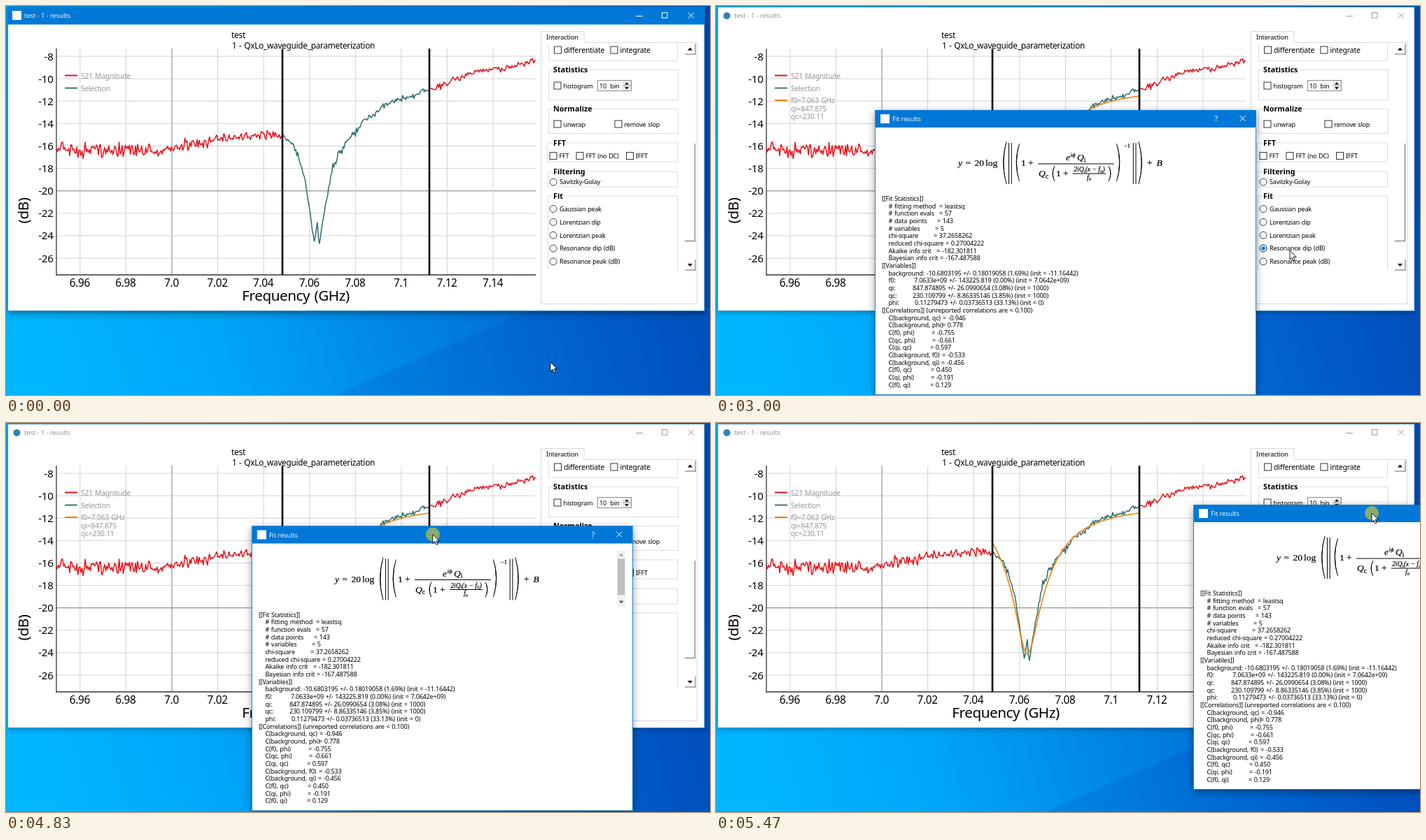
Recreate the animation shown at these times as an HTML page. Size 1006 px wide and 557 px high, loop 6280 ms.

```html
<!DOCTYPE html>
<html lang="en">
<head>
<meta charset="utf-8">
<title>Fit results</title>
<style>
html, body { margin: 0; width: 100%; height: 100%; overflow: hidden; background: #0078d7; }
svg { display: block; width: 100%; height: 100%; }
text { font-family: "Noto Sans", "Open Sans", sans-serif; letter-spacing: -.022em; word-spacing: .07em; white-space: pre; }
.bold { font-weight: 700; letter-spacing: 0; }
.bar { font-family: "Open Sans", "Noto Sans", sans-serif; letter-spacing: -.01em; word-spacing: 0; }
.math text { font-family: "Liberation Serif", "Noto Serif", serif; letter-spacing: 0; word-spacing: 0; stroke: #000; stroke-width: .2; }
.it { font-style: italic; }
.mid { text-anchor: middle; }
.end { text-anchor: end; }
.soft { filter: drop-shadow(0 3px 6px rgba(0, 0, 0, .4)); }
.faint { filter: drop-shadow(0 2px 4px rgba(0, 0, 0, .25)); }
</style>
</head>
<body>
<svg id="stage" viewBox="0 0 1006 557" preserveAspectRatio="none"></svg>
<script>
const LOOP = 6280;
const RED = '#e3131b', TEAL = '#2c6f6c', ORANGE = '#f57f0c', BLUE = '#0078d7';

// Drawing helpers
const text = (x, y, s, size, cls = '', fill = '#000') =>
  `<text x="${x}" y="${y}" font-size="${size}" class="${cls}" fill="${fill}">${s}</text>`;
const line = (x1, y1, x2, y2, stroke = '#000', w = 1) =>
  `<path d="M${x1} ${y1}L${x2} ${y2}" stroke="${stroke}" stroke-width="${w}" fill="none"/>`;
const rect = (x, y, w, h, fill, stroke = 'none', more = '') =>
  `<rect x="${x}" y="${y}" width="${w}" height="${h}" fill="${fill}" stroke="${stroke}" ${more}/>`;
const shape = (d, fill) => `<path d="${d}" fill="${fill}"/>`;
const cross = (x, y, r, c) => line(x - r, y - r, x + r, y + r, c) + line(x - r, y + r, x + r, y - r, c);
const group = (id, body, more = '') => `<g id="${id}" ${more}>${body}</g>`;

// Linear interpolation through rows of [key, ...values]
function along(rows, k) {
  if (k <= rows[0][0]) return rows[0].slice(1);
  for (let i = 1; i < rows.length; i++) {
    const a = rows[i - 1], b = rows[i];
    if (k <= b[0]) return a.slice(1).map((v, j) => v + (b[j + 1] - v) * (k - a[0]) / (b[0] - a[0]));
  }
  return rows[rows.length - 1].slice(1);
}

// Chart
const px = f => 237 + (f - 7) * 3279;
const py = v => 72 + (-8 - v) * 16.06;

let seed = 29;
function random() {
  seed = (seed * 16807) % 2147483647;
  return seed / 2147483647;
}

// x, mean height, noise
const trend = [
  [72, 206, 11], [130, 207, 12], [215, 207, 11], [245, 202, 11], [275, 199, 10], [300, 193, 8],
  [335, 187, 7], [375, 184, 7], [395, 186, 5], [405, 195, 4], [412, 206, 7], [420, 222, 8],
  [425, 241, 5], [430, 266, 6], [435, 298, 8], [440, 331, 8], [443, 328, 4], [444.5, 302, 2],
  [447, 346, 3], [452, 312, 6], [460, 262, 7], [468, 231, 9], [475, 213, 7], [485, 200, 7],
  [495, 186, 7], [505, 173, 6], [517, 159, 6], [533, 148, 6], [550, 137, 5], [570, 132, 5],
  [590, 126, 5], [605, 120, 4], [620, 115, 5], [640, 105, 5], [660, 99, 4], [672, 93, 5],
  [700, 91, 5], [720, 87, 5], [740, 83, 5], [757, 77, 4]
];

function trace(x1, x2, color) {
  const n = Math.round((x2 - x1) / 1.47), pts = [];
  for (let i = 0; i <= n; i++) {
    const x = x1 + (x2 - x1) * i / n, [y, noise] = along(trend, x);
    pts.push(x.toFixed(1) + ',' + (y + (random() + random() - 1) * noise * 1.15).toFixed(1));
  }
  return `<polyline points="${pts.join(' ')}" fill="none" stroke="${color}" stroke-width="1.5" stroke-linejoin="round"/>`;
}

// The fitted resonance dip
function model(f) {
  const qi = 847.874895, qc = 230.109799, phi = .11279473, f0 = 7.0633, base = -10.6803;
  const d = 2 * qi * (f - f0) / f0;
  const m = qi / qc / Math.hypot(1, d), a = phi - Math.atan(d);
  return base - 20 * Math.log10(Math.hypot(1 + m * Math.cos(a), m * Math.sin(a)));
}

function fitCurve() {
  const pts = [];
  for (let x = 395; x <= 606; x += 1.5) pts.push(x + ',' + py(model(7 + (x - 237) / 3279)).toFixed(1));
  return `<polyline points="${pts.join(' ')}" fill="none" stroke="${ORANGE}" stroke-width="1.6"/>`;
}

function chart() {
  let s = '';
  for (let i = 0; i < 10; i++) {
    const y = py(-8 - 2 * i), x = px(6.96 + .02 * i);
    s += line(72, y, 757, y, i === 6 ? '#7d7d7d' : '#d2d2d2');
    s += line(x, 61, x, 385, i === 2 ? '#7d7d7d' : '#d2d2d2');
    s += text(67.5, y + 5.5, -8 - 2 * i, 15.2, 'end');
    const label = i === 2 ? '7.0' : String(+(6.96 + .02 * i).toFixed(2));
    s += text(x - .5, 402, label, 15.4, 'mid');
  }
  s += line(72, 61, 72, 385.5, '#333', 1.3) + line(71.5, 385, 757, 385, '#333', 1.3);
  s += trace(72, 395, RED) + trace(395, 605, TEAL) + trace(605, 757, RED);
  s += group('fit', fitCurve() + line(84, 135, 102, 135, ORANGE, 2) +
    ['f0=7.063 GHz', 'qi=847.875', 'qc=230.11'].map((v, i) => text(107, 139 + i * 11.6, v, 10.35, '', '#979797')).join(''));
  s += line(395, 61, 395, 385, '#000', 2.6) + line(605, 61, 605, 385, '#000', 2.6);
  s += line(84, 99.5, 102, 99.5, RED, 2) + text(107, 103.5, 'S21 Magnitude', 10.35, '', '#979797');
  s += line(84, 117.5, 102, 117.5, '#2c7c6c', 2) + text(107, 121.5, 'Selection', 10.35, '', '#979797');
  s += text(322, 46, 'test', 12) + text(323, 60.5, '1 - QxLo_waveguide_parameterization', 11.8);
  s += text(414, 422, 'Frequency (GHz)', 20.7, 'mid');
  s += `<g transform="translate(32 293) rotate(-90)">${text(0, 0, '(dB)', 20.7, 'mid')}</g>`;
  return s;
}

// Side panel
const check = (x, y, label, size = 9.07) =>
  rect(x + .5, y + .5, 10, 10, '#fff', '#333') + text(x + 14, y + 9, label, size);
const radio = (y, label) =>
  `<circle cx="782" cy="${y}" r="5" fill="#fff" stroke="#444"/>` + text(791, y + 3.4, label, 9.07);
const box = (x, y, w, h, title, tw) =>
  rect(x + .5, y + .5, w, h, 'none', '#dcdcdc') + rect(781, y - 3, tw, 7, '#fff') +
  text(782, y + 4.3, title, 10.8, 'bold');
const bevel = (x, y, w, h) =>
  rect(x, y, w, h, '#fff') + line(x, y + h - .5, x + w, y + h - .5, '#666') + line(x + w - .5, y, x + w - .5, y + h, '#666');

function panel() {
  let s = rect(764.5, 52.5, 223, 374, '#fff', '#d9d9d9') + rect(764.5, 36.5, 61.5, 16, '#fff', '#d9d9d9') +
    rect(765, 51, 60.5, 3, '#fff') + text(772, 48, 'Interaction', 9.3);
  s += `<path d="M775.5 54V78.5H959.5V54" fill="none" stroke="#dcdcdc"/>`;
  s += check(783, 57.5, 'differentiate', 10.55) + check(863.5, 57.5, 'integrate', 10.55);
  s += box(775, 91, 185, 43, 'Statistics', 53) + check(782.5, 108.5, 'histogram');
  s += rect(845.5, 106.5, 48, 15, '#fff', '#8a8a8a') + text(848, 118, '10  bin', 9.07);
  s += rect(881, 107, 12, 14, '#eee') + line(881, 114, 893, 114, '#aaa') +
    shape('M884 112.5l3-3.4 3 3.4zM884 116l3 3.4 3-3.4z', '#111');
  s += box(775, 147, 185, 35, 'Normalize', 54) + check(782.5, 163.5, 'unwrap') + check(869.5, 163.5, 'remove slop');
  s += box(773, 195.5, 186, 27, 'FFT', 19) + check(776.5, 209, 'FFT') + check(814.5, 209, 'FFT (no DC)') + check(886, 209, 'IFFT');
  s += box(774, 236.5, 185, 22, 'Filtering', 45) + radio(252, 'Savitzky-Golay');
  s += box(774, 271.5, 185, 120, 'Fit', 16) + rect(770, 378, 200, 16, '#fff');
  ['Gaussian peak', 'Lorentzian dip', 'Lorentzian peak', 'Resonance dip (dB)', 'Resonance peak (dB)']
    .forEach((v, i) => s += radio(290.5 + 18.85 * i, v));
  s += `<circle id="dot" cx="782" cy="347" r="2.7"/><circle id="ring" cx="782" cy="347" r="5" fill="none"/>`;
  s += bevel(970, 54, 15.5, 15.5) + shape('M974 63.5l3.5-4 3.5 4z', '#000');
  s += bevel(970, 197, 15, 140) + bevel(970, 363, 15.5, 15.5) + shape('M974 369l3.5 4 3.5-4z', '#000');
  return s;
}

// Title bars
function buttons(c) {
  return line(900, 14.5, 910, 14.5, c) + rect(937.5, 9.5, 7.5, 7.5, 'none', c) + cross(979, 13.5, 4, c);
}
function mainWindow() {
  const on = rect(2, 1, 996, 25.5, BLUE) + rect(9, 7, 13, 13, '#fff') +
    text(26, 17, 'test - 1 - results', 9.5, 'bar', '#fff') + buttons('#fff');
  const off = '<circle cx="15.5" cy="14" r="5" fill="#2b86b8"/>' +
    text(26, 17, 'test - 1 - results', 9.5, 'bar', '#8d8d8d') + buttons('#999');
  return rect(2.5, 1.5, 995.5, 435, '#fff', '#3f8fc8', 'id="frame"') + group('on', on) + group('off', off) + chart() + panel();
}

// Formula
const paren = (x, y1, y2, w, dir) => {
  const c = x + dir * w, m = (y1 + y2) / 2, i = c - dir * w * 1.35;
  return shape(`M${c} ${y1}Q${i} ${m} ${c} ${y2}Q${i + dir * 2.2} ${m} ${c} ${y1}Z`, '#000') +
    `<path d="M${c} ${y1}Q${i + dir} ${m} ${c} ${y2}" fill="none" stroke="#000" stroke-width=".9"/>`;
};
const bars = x => line(x, 196, x, 255) + line(x + 3.7, 196, x + 3.7, 255);
const sub = (s, size) => `<tspan dy="2.5" font-size="${size}" font-style="normal">${s}</tspan>`;

function formula() {
  let s = text(346, 229, 'y', 13.5, 'it') + text(356.5, 229, '=', 13.5) + text(369.5, 229, '20', 13.5) + text(385, 229, 'log', 13.5);
  s += paren(408, 194, 255, 7, 1) + bars(418.5) + paren(426.5, 197, 251, 7, 1);
  s += text(436, 229, '1', 13.5) + text(446, 229, '+', 13.5) + line(460, 226, 569, 226);
  s += text(500, 221, 'e', 13.5, 'it') + text(506.5, 216, 'iϕ', 9, 'it') + text(516, 221, 'Q' + sub('i', 9.5), 13.5, 'it');
  s += text(461, 244, 'Q' + sub('c', 9.5), 13.5, 'it') + paren(479, 229, 251, 5, 1);
  s += text(486, 244, '1', 13.5) + text(496, 244, '+', 13.5) + line(510, 240, 557, 240);
  s += text(533.5, 237, '2iQ' + '<tspan dy="1.5" font-size="7" font-style="normal">i</tspan>' +
    '<tspan dy="-1.5">(x − f</tspan><tspan dy="1.5" font-size="7" font-style="normal">0</tspan><tspan dy="-1.5">)</tspan>', 9.6, 'it mid');
  s += text(530, 248.5, 'f' + '<tspan dy="1.5" font-size="7" font-style="normal">0</tspan>', 9.6, 'it');
  s += paren(566, 229, 251, 5, -1) + paren(579.5, 197, 251, 7, -1) + text(583, 203, '−1', 8.5);
  s += bars(596.3) + paren(611, 194, 255, 7, -1) + text(616, 229, '+', 13.5) + text(629.5, 229, 'B', 13.5, 'it');
  return s;
}

// Report rows: label, then x and text of the second column
const report = `[[Fit Statistics]]
# fitting method|319|= leastsq
# function evals|319|= 57
# data points|316|= 143
# variables|313|= 5
chi-square|311|= 37.2658262
reduced chi-square = 0.27004222
Akaike info crit|315|= -182.301811
Bayesian info crit = -167.487588
[[Variables]]
background: -10.6803195 +/- 0.18019058 (1.69%) (init = -11.16442)
f0:|283|7.0633e+09 +/- 143225.819 (0.00%) (init = 7.0642e+09)
qi:|281|847.874895 +/- 26.0990654 (3.08%) (init = 1000)
qc:|281|230.109799 +/- 8.86335146 (3.85%) (init = 1000)
phi:|284|0.11279473 +/- 0.03736513 (33.13%) (init = 0)
[[Correlations]] (unreported correlations are &lt; 0.100)
C(background, qc)|324|= -0.946
C(background, phi)|323|= 0.778
C(f0, phi)|308|= -0.755
C(qc, phi)|309|= -0.661
C(qi, qc)|306|= 0.597
C(background, f0)|323|= -0.533
C(background, qi)|322|= -0.456
C(f0, qc)|307|= 0.450
C(qi, phi)|307|= -0.191
C(f0, qi)|306|= 0.129`.split('\n');

function dialog() {
  const rows = report.map((r, i) => {
    const [label, x, value] = r.split('|'), y = 279 + i * 10.67;
    return text(label[0] === '[' ? 237 : 246.5, y, label, 9.07) + (value ? text(x, y, value, 9.07) : '');
  }).join('');
  const bar = rect(749, 184, 12, 81, '#f1f1f1') + rect(750, 196, 10.5, 52, '#bfbfbf') +
    shape('M752 192l3.3-4 3.3 4z', '#a0a0a0') + shape('M752 256l3.3 4 3.3-4z', '#555');
  return rect(227.5, 149.5, 544, 141, '#fff', '#2a86d0', 'id="body" class="soft"') + rect(228, 149, 543, 25, BLUE) +
    rect(235, 155, 13, 13, '#fff') + text(252, 165, 'Fit results', 9.3, 'bar', '#fff') +
    text(712.5, 165, '?', 11, 'bar', '#fff') + cross(752.5, 161, 4, '#fff') +
    group('rows', rows) + group('formula', formula(), 'class="math"') + group('scroll', bar);
}

const stage = document.getElementById('stage');
stage.innerHTML = `<defs><linearGradient id="sky" x1="0" y1=".55" x2="1" y2=".4">
  <stop offset="0" stop-color="#00b6ff"/><stop offset=".25" stop-color="#00a6f8"/>
  <stop offset=".5" stop-color="#0086e6"/><stop offset=".75" stop-color="#0067d2"/>
  <stop offset="1" stop-color="#004db8"/></linearGradient></defs>` +
  rect(0, 0, 1006, 557, 'url(#sky)') + shape('M470 557L745 437H1006V557Z', 'rgba(0,50,160,.13)') +
  group('main', mainWindow()) + group('dialog', dialog()) +
  '<circle id="press" r="10" fill="#e4cf28" fill-opacity=".6"/>' +
  group('cursor', '<path d="M0 0V13L3 10.2L5.2 15L7.3 14L5.1 9.5H9.3Z" fill="#fff" stroke="#000" stroke-width=".9"/>');

// Motion: [start, end, steps]
const moves = [[650, 1270, 17], [1320, 1900, 16], [3750, 4340, 16], [4460, 5070, 15], [5120, 5470, 10]];
const pointer = [
  [0, 778, 510], [649, 778, 510], [650, 779, 508], [820, 818, 485], [980, 862, 448], [1150, 852, 417],
  [1270, 834, 386], [1320, 830, 381], [1450, 800, 352], [1600, 778, 343], [1900, 820, 350],
  [3749, 820, 350], [3750, 764, 313], [4000, 600, 212], [4340, 487, 161], [4460, 488, 161],
  [4806, 609, 159.5], [5070, 702, 157], [5120, 718, 155], [5195, 775, 148.5], [5470, 937, 129]
];
const drag = [
  [4460, 0, 0], [4806, 123, -1.5], [5070, 214, -4], [5120, 232, -6], [5195, 280, -11.5], [5470, 455, -32]
];

function stepped(t) {
  let out = 0;
  for (const [a, b, n] of moves) {
    if (t < a) break;
    const d = (b - a) / (n - 1);
    out = Math.min(b, a + Math.floor((t - a) / d + 1e-6) * d);
  }
  return out;
}

const el = id => document.getElementById(id);
const show = (id, on) => el(id).style.display = on ? '' : 'none';

function draw(t) {
  const k = stepped(t), [cx, cy] = along(pointer, k), [dx, dy] = along(drag, k);
  const at = `translate(${cx.toFixed(1)} ${cy.toFixed(1)})`;
  el('cursor').setAttribute('transform', at);
  el('press').setAttribute('transform', at);
  el('dialog').setAttribute('transform', `translate(${dx.toFixed(1)} ${dy.toFixed(1)})`);
  const open = t >= 2450, done = t >= 2590;
  show('press', (t >= 2230 && t < 2330) || t >= 4460);
  show('on', !open);
  show('off', open);
  el('frame').setAttribute('class', open ? 'faint' : 'soft');
  show('dialog', open);
  el('body').setAttribute('height', t < 2540 ? 141 : 407);
  show('rows', done);
  show('fit', done);
  show('formula', t >= 3000);
  show('scroll', t >= 3030);
  show('dot', t >= 2230);
  show('ring', t >= 2230);
  el('dot').setAttribute('fill', done ? BLUE : '#707070');
  el('ring').setAttribute('stroke', done ? BLUE : '#777');
}

const start = performance.now();
function tick() {
  draw((performance.now() - start) % LOOP);
  requestAnimationFrame(tick);
}
tick();
</script>
</body>
</html>
```
